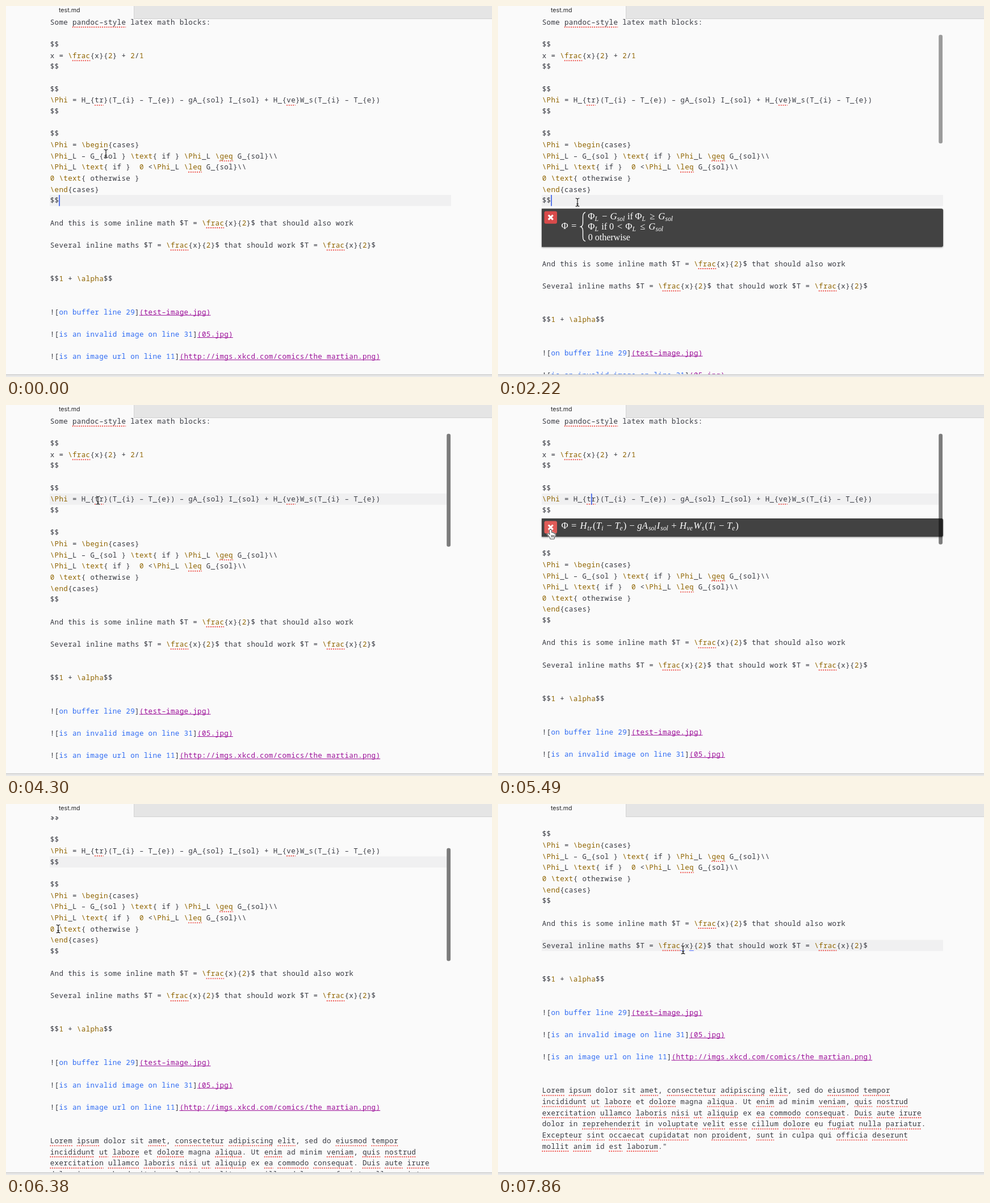
Animation, 856 px wide and 654 px high, one loop 8 s. Source, as an HTML page with a canvas:

```html
<!DOCTYPE html>
<html lang="en">
<head>
<meta charset="utf-8">
<title>Markdown math preview</title>
<style>
html, body { margin: 0; width: 100%; height: 100%; overflow: hidden; background: #fafafa; }
canvas { display: block; width: 856px; height: 654px; }
</style>
</head>
<body>
<canvas id="stage" width="856" height="654"></canvas>
<script>
const ctx = document.getElementById('stage').getContext('2d');
const LOOP = 8000, TICK = 148, LAST = 53;
const LEFT = 77.5, RIGHT = 784, TOP = 18.6, ROW = 19.65, CHAR = 7.86, SIZE = 12.5;
const MONO = SIZE + 'px "Noto Sans Mono", monospace';
const INK = '#383a42', BROWN = '#906500', BLUE = '#2f6bf3', PURPLE = '#9c0f99', PAPER = '#fafafa';

const LINES = String.raw`Some pandoc-style latex math blocks:

$$
x = \frac{x}{2} + 2/1
$$

$$
\Phi = H_{tr}(T_{i} - T_{e}) - gA_{sol} I_{sol} + H_{ve}W_s(T_{i} - T_{e})
$$

$$
\Phi = \begin{cases}
\Phi_L - G_{sol } \text{ if } \Phi_L \geq G_{sol}\\
\Phi_L \text{ if }  0 <\Phi_L \leq G_{sol}\\
0 \text{ otherwise }
\end{cases}
$$

And this is some inline math $T = \frac{x}{2}$ that should also work

Several inline maths $T = \frac{x}{2}$ that should work $T = \frac{x}{2}$


$$1 + \alpha$$


![on buffer line 29](test-image.jpg)

![is an invalid image on line 31](05.jpg)

![is an image url on line 11](http://imgs.xkcd.com/comics/the_martian.png)


Lorem ipsum dolor sit amet, consectetur adipiscing elit, sed do eiusmod tempor
incididunt ut labore et dolore magna aliqua. Ut enim ad minim veniam, quis nostrud
exercitation ullamco laboris nisi ut aliquip ex ea commodo consequat. Duis aute irure
dolor in reprehenderit in voluptate velit esse cillum dolore eu fugiat nulla pariatur.
Excepteur sint occaecat cupidatat non proident, sunt in culpa qui officia deserunt
mollit anim id est laborum."`.split('\n');

const MISSPELT = new RegExp('\\b(' + ('pandoc-style frac tr ve geq leq Lorem ipsum amet consectetur adipiscing elit ' +
  'eiusmod tempor incididunt ut labore dolore aliqua enim veniam quis nostrud exercitation ullamco laboris nisi ' +
  'aliquip ea commodo consequat Duis aute irure reprehenderit voluptate velit esse cillum fugiat nulla pariatur ' +
  'Excepteur sint occaecat cupidatat proident sunt officia deserunt mollit anim est laborum').split(' ').join('|') + ')\\b', 'g');

const colX = c => LEFT + c * CHAR;
const within = (n, ...spans) => spans.some(([a, b]) => n >= a && n <= b);

function box(x, y, w, h, color) {
  ctx.fillStyle = color;
  ctx.fillRect(x, y, w, h);
}

function roundBox(x, y, w, h, r, color) {
  ctx.fillStyle = color;
  ctx.beginPath();
  ctx.roundRect(x, y, w, h, r);
  ctx.fill();
}

// Split a line into [text, colour] runs; a link's underline hides its underscores
function runs(line) {
  const link = line.match(/^(!\[)(.*)(\])(\(.*\))$/);
  if (link) return [[link[1], INK], [link[2], BLUE], [link[3], INK], [link[4].replace('_', ' '), PURPLE]];
  return line.split(/(\\[a-z]+|\d)/i).map((s, i) => [s, i % 2 ? BROWN : INK]);
}

function drawLine(line, y) {
  let col = 0;
  ctx.save();
  ctx.font = MONO;
  ctx.letterSpacing = CHAR - SIZE * .6 + 'px';
  for (const [text, color] of runs(line)) {
    ctx.fillStyle = color;
    ctx.fillText(text.replace(/-/g, '–'), colX(col) + .2, y + 14.2);
    if (color === PURPLE) ctx.fillRect(colX(col), y + 15.2, text.length * CHAR, 1);
    col += text.length;
  }
  ctx.strokeStyle = '#ee4f49';
  ctx.lineWidth = 1.87;
  ctx.lineCap = 'butt';
  ctx.setLineDash([1.87, 1.87]);
  for (const m of line.matchAll(MISSPELT)) {
    ctx.beginPath();
    ctx.moveTo(colX(m.index), y + 18.7);
    ctx.lineTo(colX(m.index + m[0].length), y + 18.7);
    ctx.stroke();
  }
  ctx.restore();
}

// Small formula setter: advances in em, _{..} for subscripts, "..." for upright text
const EM = 15.6;
const ADV = { 'Φ': .722, '=': 1.334, '≥': 1.334, '≤': 1.334, '<': 1.334, '−': 1.222, '+': 1.222,
  '(': .389, ')': .389, H: .831, T: .584, g: .477, A: .75, I: .44, W: .944, G: .786, L: .681,
  t: .361, r: .451, i: .345, e: .466, s: .469, o: .485, l: .298, v: .485 };

function math(src, x, y) {
  ctx.fillStyle = '#fff';
  const glyph = (ch, size, dy) => {
    const adv = ADV[ch] * EM * size;
    ctx.font = (/[a-z]/i.test(ch) ? 'italic ' : '') + 16.6 * size + 'px "Liberation Serif", serif';
    ctx.fillText(ch, x + (adv - ctx.measureText(ch).width) / 2, y + dy);
    x += adv;
  };
  for (const [part] of src.matchAll(/_\{[^}]*\}|"[^"]*"|\S/g)) {
    if (part[0] === '_') {
      for (const ch of part.slice(2, -1)) glyph(ch, .7, 2.6);
      x += .05 * EM;
    } else if (part[0] === '"') {
      const text = part.slice(1, -1);
      ctx.font = '16px "Liberation Serif", serif';
      ctx.fillText(text, x, y);
      x += ctx.measureText(text).width;
    } else glyph(part, 1, 0);
  }
}

function brace(x, y, h) {
  const m = y + h / 2, b = y + h;
  ctx.strokeStyle = '#fff';
  ctx.lineWidth = 1.4;
  ctx.beginPath();
  ctx.moveTo(x + 4.5, y);
  ctx.bezierCurveTo(x + 1, y + 1, x, y + 4, x, y + 8);
  ctx.lineTo(x, m - 7);
  ctx.bezierCurveTo(x, m - 3, x - 1, m - 1, x - 4, m);
  ctx.bezierCurveTo(x - 1, m + 1, x, m + 3, x, m + 7);
  ctx.lineTo(x, b - 8);
  ctx.bezierCurveTo(x, b - 4, x + 1, b - 1, x + 4.5, b);
  ctx.stroke();
}

const FORMULA = {
  16: y => {
    math('Φ=', 112, y + 36);
    brace(149.5, y + 6.5, 51);
    math('Φ_{L}−G_{sol}" if "Φ_{L}≥G_{sol}', 158.7, y + 19);
    math('Φ_{L}" if 0"<Φ_{L}≤G_{sol}', 158.7, y + 37);
    math('"0 otherwise"', 158.7, y + 55.5);
  },
  8: y => math('Φ=H_{tr}(T_{i}−T_{e})−gA_{sol}I_{sol}+H_{ve}W_{s}(T_{i}−T_{e})', 112, y + 18.5)
};

// Preview panel state: the line it follows, its size
function panelAt(n) {
  const grow = k => [36, 56, 420, 707][Math.min(k, 3)];
  if (within(n, [6, 18])) return { line: 16, w: grow(n - 6), h: n < 8 ? 33 : 67.5 };
  if (within(n, [31, 37])) return { line: 8, w: grow(n - 31), h: 32.4 };
  return null;
}

function drawPanel(p, y, hover) {
  ctx.save();
  ctx.shadowColor = 'rgba(0,0,0,.4)';
  ctx.shadowBlur = 3;
  ctx.shadowOffsetY = 1;
  roundBox(77, y, p.w, p.h, [0, 3, 3, 0], '#424242');
  ctx.restore();
  ctx.save();
  ctx.beginPath();
  ctx.rect(77, y, p.w, p.h);
  ctx.clip();
  FORMULA[p.line](y);
  roundBox(81.5, y + 4.5, 22.5, 22, 3, hover ? '#e05c58' : '#d84b4b');
  ctx.strokeStyle = '#fff';
  ctx.lineWidth = 3;
  ctx.lineCap = 'butt';
  ctx.beginPath();
  for (const d of [-1, 1]) {
    ctx.moveTo(92.8 - 4, y + 15.5 - 4 * d);
    ctx.lineTo(92.8 + 4, y + 15.5 + 4 * d);
  }
  ctx.stroke();
  ctx.restore();
}

// Pointer stops: tick, x, y
const PATH = [[0, 176, 260], [13, 176, 260], [15, 140, 346], [17, 93, 372], [19, 93, 372], [25, 162, 168],
  [33, 162, 168], [36, 93, 219], [38, 92, 220], [46, 92, 220], [50, 326, 257], [LAST, 326, 257]];

function pointerAt(n) {
  const i = Math.max(1, PATH.findIndex(p => p[0] >= n));
  const [a, b] = [PATH[i - 1], PATH[i]];
  const u = (n - a[0]) / (b[0] - a[0]);
  return [a[1] + (b[1] - a[1]) * u, a[2] + (b[2] - a[2]) * u];
}

function outlined(path, outer, inner) {
  ctx.lineCap = ctx.lineJoin = 'round';
  ctx.strokeStyle = '#fff';
  ctx.lineWidth = outer;
  ctx.stroke(path);
  ctx.strokeStyle = '#000';
  ctx.lineWidth = inner;
  ctx.stroke(path);
}
const IBEAM = new Path2D('M-3 -7Q0 -7 0 -5Q0 -7 3 -7M0 -5V5M-3 7Q0 7 0 5Q0 7 3 7M-1.5 3H1.5');
const HAND = new Path2D('M-1.6 1.2Q0 -.6 1.4 1.2L2 6Q3.6 4.8 4.4 6.4Q6 5.6 6.6 7.2Q8 6.8 8 8.6V11' +
  'Q7.6 13 6.4 14.2V16.2H-.4V14.4Q-2.6 12 -5 8.6Q-5 6.8 -3.2 7.6L-1 9.4Z');

function drawPointer(x, y, hand) {
  ctx.save();
  ctx.translate(x, y);
  if (hand) {
    outlined(HAND, 2.6, 1.4);
    ctx.fillStyle = '#fff';
    ctx.fill(HAND);
    ctx.lineWidth = .8;
    ctx.stroke(new Path2D('M1.6 10V13.5M3.6 10V13.5M5.6 10V13.5'));
  } else outlined(IBEAM, 2.2, 1.1);
  ctx.restore();
}

// Blinking caret: line and column, or null while hidden
function caretAt(n) {
  if (within(n, [0, 0], [4, 6], [9, 11], [15, 16], [19, 21], [25, 25])) return [16, 2];
  if (within(n, [26, 28], [31, 33], [37, 37])) return [7, 11];
  if (within(n, [38, 40], [44, 46])) return [8, 2];
  if (within(n, [50, 52])) return [20, 32];
  return null;
}

function draw(n) {
  const u = Math.min(1, Math.max(0, (n - 41) / 7));
  const scroll = 172 * (1 - Math.pow(1 - u, 1.97));
  const active = n < 26 ? 16 : n < 38 ? 7 : n < 50 ? 8 : 20;
  const panel = panelAt(n);
  const push = panel ? panel.h + 4.5 : 0;
  const rowY = i => TOP + i * ROW - scroll + (panel && i > panel.line ? push : 0);
  const bar = n < 14 || n > 49 ? 0 : n === 14 ? .18 : n === 15 ? .38 : n === 49 ? .25 : .5;
  const [px, py] = pointerAt(n);

  box(0, 0, 856, 654, PAPER);
  ctx.save();
  ctx.beginPath();
  ctx.rect(0, 22, 856, 627);
  ctx.clip();
  box(77, rowY(active), (bar === .5 ? 776 : RIGHT) - 77, ROW, '#f0f0f1');
  LINES.forEach((line, i) => drawLine(line, rowY(i)));
  if (n >= 50) for (const c of [31, 33]) box(colX(c), Math.round(rowY(20) + 18), CHAR, 1, '#526fff');
  const caret = caretAt(n);
  if (caret) box(colX(caret[1]), rowY(caret[0]), 1.7, ROW, '#3f63e8');

  const panelY = panel && rowY(panel.line) + ROW + 4.5;
  const hand = panel !== null && px > 81 && px < 104 && py > panelY + 4 && py < panelY + 27;
  if (panel) drawPanel(panel, panelY, hand);
  if (bar) roundBox(776.2, 50.7 + scroll * .324, 6.8, 199 - push * .105, 3, `rgba(0,0,0,${bar})`);
  ctx.restore();

  box(225, 0, 631, 22, '#e5e5e5');
  box(225, 22, 631, 1, '#d2d2d2');
  box(225, 0, 1, 23, '#d2d2d2');
  box(0, 649, 856, 5, '#e8e8e8');
  box(0, 649, 856, 2, '#d5d5d5');
  ctx.fillStyle = '#242425';
  ctx.font = '10.6px Inter, sans-serif';
  ctx.fillText('test.md', 93, 11);
  drawPointer(px, py, hand);
}

function frame() {
  draw(Math.min(LAST, Math.floor(performance.now() % LOOP / TICK)));
  requestAnimationFrame(frame);
}
frame();
</script>
</body>
</html>
```
